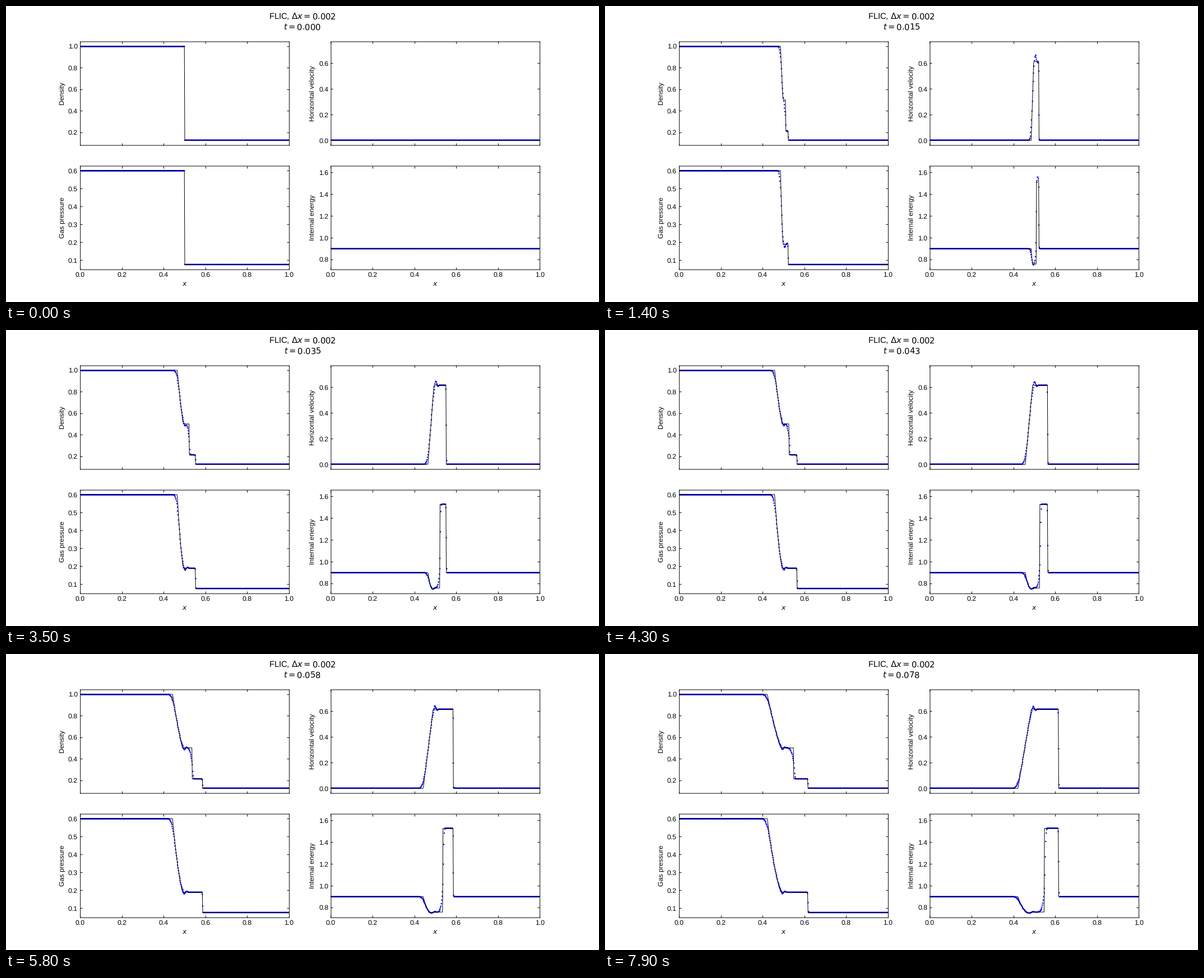
A matplotlib script for the animation above (8000 ms loop, 1058x529 px).

```python
import math

import matplotlib.pyplot as plt
import numpy as np
from matplotlib.animation import FuncAnimation
from matplotlib.transforms import Affine2D, IdentityTransform

plt.rcParams.update({
    "font.family": "Liberation Sans",
    "mathtext.fontset": "dejavusans",
    "text.hinting": "none",
    "xtick.direction": "in",
    "ytick.direction": "in",
    "xtick.top": True,
    "ytick.right": True,
})

FRAMES, INTERVAL = 80, 100
WIDTH = 1058
DENSE = 1200 / WIDTH  # dots and frames sit on a slightly finer pixel grid
CELLS = 500
GAMMA = 5 / 3
RHO_L, P_L = 1.0, 0.6
RHO_R, P_R = 0.125, 0.075
X0 = 0.5
x = (np.arange(CELLS) + 0.5) / CELLS

erf = np.vectorize(math.erf)


def star_state():
    """Pressure and speed between the rarefaction and the shock."""
    lo, hi = P_R, P_L
    for _ in range(60):
        p = (lo + hi) / 2
        left = 3 * (1 - (p / P_L) ** 0.2)
        right = (p - P_R) * math.sqrt(0.75 / RHO_R / (p + 0.25 * P_R))
        lo, hi = (p, hi) if left > right else (lo, p)
    return p, left


P_S, U_S = star_state()
RATIO = P_S / P_R
RHO_SR = RHO_R * (RATIO + 0.25) / (0.25 * RATIO + 1)
HEAD = -1.0
TAIL = U_S - (1 - U_S / 3)
SHOCK = math.sqrt(0.8 * (RATIO - 1) + 1)


def cdf(z):
    return 0.5 * (1 + erf(z / math.sqrt(2)))


def soft_ramp(d, s):
    """max(d, 0) rounded off over a width s."""
    z = d / s
    return s * (np.exp(-z * z / 2) / math.sqrt(2 * math.pi) + z * cdf(z))


def bell(d, w):
    return np.exp(-(d / w) ** 2)


def fields(rho, u, p):
    return rho, u, p, p / ((GAMMA - 1) * rho) + u * u / 2


def start():
    left = x < X0
    return fields(np.where(left, RHO_L, RHO_R), np.zeros(CELLS),
                  np.where(left, P_L, P_R))


def exact(t):
    s = (x - X0) / t
    u = U_S * np.clip((s - HEAD) / (TAIL - HEAD), 0, 1)
    c = 1 - u / 3
    rho, p = c ** 3, P_L * c ** 5
    rho = np.where(s > U_S, RHO_SR, rho)
    ahead = s > SHOCK
    return fields(np.where(ahead, RHO_R, rho), np.where(ahead, 0, u),
                  np.where(ahead, P_R, p))


def scheme(t):
    """Smeared fan and contact, with an overshoot behind the fan's tail."""
    root = math.sqrt(t)
    head, tail, contact, shock = (X0 + v * t for v in (HEAD, TAIL, U_S, SHOCK))

    fan = soft_ramp(x - head, 0.0448 * root) - soft_ramp(x - tail, 0.036 * root)
    grow = 1 - math.exp(-t / 0.004)
    d = x - tail - 0.008 * grow
    bump = bell(d, 0.0055 * grow) - 0.25 * bell(d - 0.012 * grow, 0.005 * grow)
    amp = 0.034 + 0.09 * math.exp(-t / 0.0085)
    u = U_S * fan / (tail - head) + amp * bump

    c = 1 - u / 3
    rho, p = c ** 3, P_L * c ** 5

    d = x - contact - 0.005 * root
    mix = cdf(d / np.where(d < 0, 0.04 * root, 0.0135 * root))
    heat = 0.085 * math.exp(-t / 0.012) * bell(x - contact - 0.006 * grow, 0.005)
    hot = RHO_SR * (p / P_S) ** (1 / GAMMA) * (1 - heat / 1.344)
    rho = rho * (1 - mix) + hot * mix

    behind = 1 - cdf((x - shock - 0.0005) / 0.0012)
    return fields(RHO_R + (rho - RHO_R) * behind, u * behind,
                  P_R + (p - P_R) * behind)


def clock(i):
    """The first time step is longer than the later ones."""
    return 0.000975 * i + 0.00105 * (1 - math.exp(-1.3 * i))


def on_grid(ax, y):
    """Stage positions of the cells, rounded to the finer grid."""
    return np.round(ax.transData.transform(np.c_[x, y]) * DENSE) / DENSE


fig, axes = plt.subplots(2, 2, sharex=True, figsize=(12, 6), dpi=WIDTH / 12)
fig.patch.set_facecolor("white")
PANELS = [
    ("Density", 0.08125, 1.04375),
    ("Horizontal velocity", -0.0366, 0.7684),
    ("Gas pressure", 0.04875, 0.62625),
    ("Internal energy", 0.7084, 1.6609),
]
half = Affine2D().translate(0.5 / DENSE, -0.5 / DENSE)
dots, lines = [], []
for ax, (name, low, high) in zip(axes.flat, PANELS):
    dots.append(ax.scatter(x, x, s=np.full(CELLS, 4.0), c="b", linewidths=0,
                           transform=IdentityTransform()))
    lines.append(ax.plot(x, x, "k-", linewidth=0.8)[0])
    ax.set_ylabel(name)
    ax.set_xlim(0, 1)
    ax.set_ylim(low, high)
    for spine in ax.spines.values():
        spine.set_snap(False)
        spine.set_transform(spine.get_spine_transform() + half)
for ax in axes[1]:
    ax.set_xlabel("$x$")
title = fig.suptitle("")


def update(i):
    t = clock(i)
    numeric, true = (scheme(t), exact(t)) if i else (start(), start())
    for ax, dot, line, a, b in zip(axes.flat, dots, lines, numeric, true):
        dot.set_offsets(on_grid(ax, a))
        line.set_ydata(b)
    title.set_text(f"FLIC, $\\Delta x = 0.002$\n$t = {t:.3f}$")
    return [*dots, *lines, title]


anim = FuncAnimation(fig, update, frames=FRAMES, interval=INTERVAL,
                     repeat=True, repeat_delay=0)
plt.show()
```
